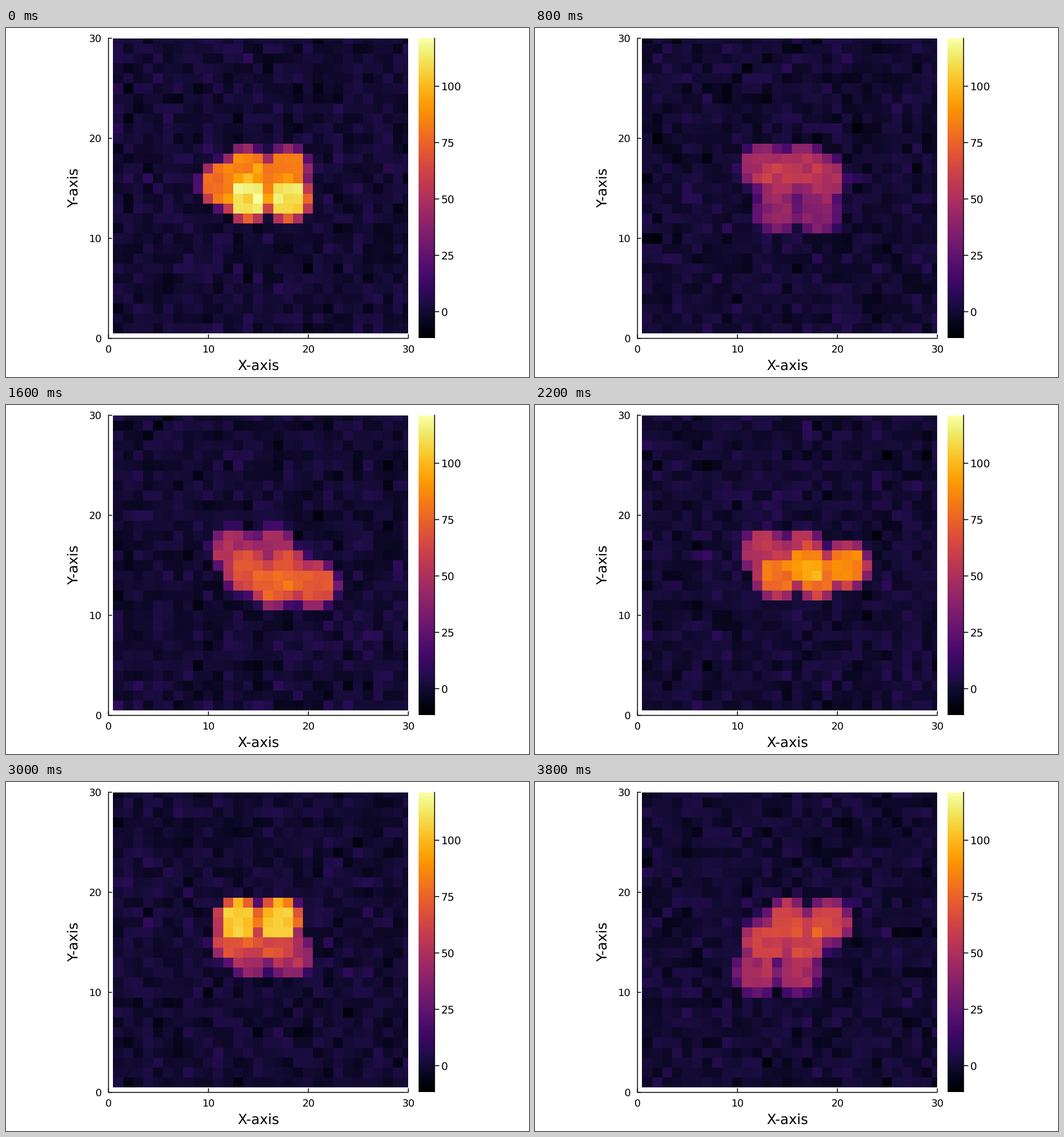
Animation, 900 px wide and 600 px high, one loop 4000 ms. Source, as a matplotlib script:

```python
import numpy as np
import matplotlib.pyplot as plt
from matplotlib.animation import FuncAnimation

plt.rcParams["text.hinting"] = "none"

W, H, DPI = 900, 600, 100
FRAMES, INTERVAL = 20, 200
N = 30
VMIN, VMAX = -11.6, 121.3
X0, Y0, UNIT = 176.4, 533.6, 17.2
BAR_L, BAR_R, TOP, BAR_B = 710, 737.5, 17.6, 532.6

# Key points of three drifting spots: x, y, level
TIMES = [0, 4, 6, 8, 11, 15, 19]
LOW = [(14, 14, 111), (14, 12.8, 40), (14.8, 14.6, 47), (16.6, 13.1, 73),
       (14, 13.9, 80), (14.2, 13.8, 51), (12, 12, 46)]
MID = [(11.4, 15.4, 80), (14.5, 16, 51), (9.5, 16, 74), (13.9, 14.5, 66),
       (16.9, 15, 86), (12.6, 15.2, 65), (12.7, 15, 61)]
HIGH = [(13.8, 16.8, 84), (12.5, 17.2, 49), (13.8, 16.5, 60),
        (12.5, 16.6, 48), (12.6, 16.4, 52), (13.1, 17.3, 105),
        (15.1, 17.1, 64)]
GAP = 4  # every spot has a twin this far to its right
RADIUS, BLUR = 2.2, 1.13

gx, gy = np.meshgrid(np.arange(1, N + 1), np.arange(1, N + 1))


def glide(track, k):
    return [np.interp(k, TIMES, c, period=FRAMES) for c in zip(*track)]


def field(k):
    total = np.zeros((N, N))
    for track in (LOW, MID, HIGH):
        x, y, level = glide(track, k)
        for dx in (0, GAP):
            d = np.hypot(gx - x - dx, gy - y)
            soft = np.clip((RADIUS - d) / BLUR + 0.5, 0, 1)
            total += (level * soft) ** 5
    noise = np.random.default_rng(100 + k).normal(0, 3, (N, N))
    return total ** 0.2 + noise


def px(u):
    return X0 + UNIT * u


def py(u):
    return Y0 - UNIT * u


fig = plt.figure(figsize=(W / DPI, H / DPI), dpi=DPI, facecolor="white")
ax = fig.add_axes([0, 0, 1, 1])
ax.axis("off")


def line(xs, ys):
    ax.plot(xs, ys, color="black", lw=1.5 * 72 / DPI, snap=False,
            solid_capstyle="butt")


def label(x, y, text, size, ha="center", **kw):
    ax.text(x, y, text, fontsize=size * 72 / DPI, family="DejaVu Sans",
            ha=ha, va="baseline", **kw)


# Cell edges fall on whole pixels, rounded towards the lower left
edges = np.minimum(np.arange(N + 1) + 0.5, N)
mesh = ax.pcolormesh(np.floor(px(edges) - 0.1), np.ceil(py(edges) - 0.1),
                     field(0), cmap="inferno", vmin=VMIN, vmax=VMAX)
ax.imshow(np.linspace(1, 0, 256)[:, None], cmap="inferno", aspect="auto",
          extent=(BAR_L, BAR_R, BAR_B, TOP), interpolation="nearest")

line([X0, X0], [TOP - 0.7, Y0 + 0.7])
line([X0, px(N)], [Y0, Y0])
for v in range(0, N + 1, 10):
    line([px(v)] * 2, [Y0, Y0 - 7])
    line([X0, X0 + 6], [py(v)] * 2)
    label(px(v), 557.3, str(v), 17.4)
    label(164.5, py(v) + 6.4, str(v), 17.4, ha="right")

line([BAR_R, BAR_R], [TOP - 0.7, BAR_B + 0.7])
for v in range(0, 101, 25):
    y = BAR_B - (v - VMIN) / (VMAX - VMIN) * (BAR_B - TOP)
    line([BAR_R, BAR_R + 8], [y, y])
    label(748.8, y + 6.7, str(v), 18.4, ha="left")

label(434.5, 588, "X-axis", 24)
label(124, 275, "Y-axis", 24, rotation=90, rotation_mode="anchor")

ax.set_xlim(0, W)
ax.set_ylim(H, 0)


def update(k):
    mesh.set_array(field(k))
    return [mesh]


anim = FuncAnimation(fig, update, frames=FRAMES, interval=INTERVAL,
                     repeat=True, repeat_delay=0, blit=False)
plt.show()
```
